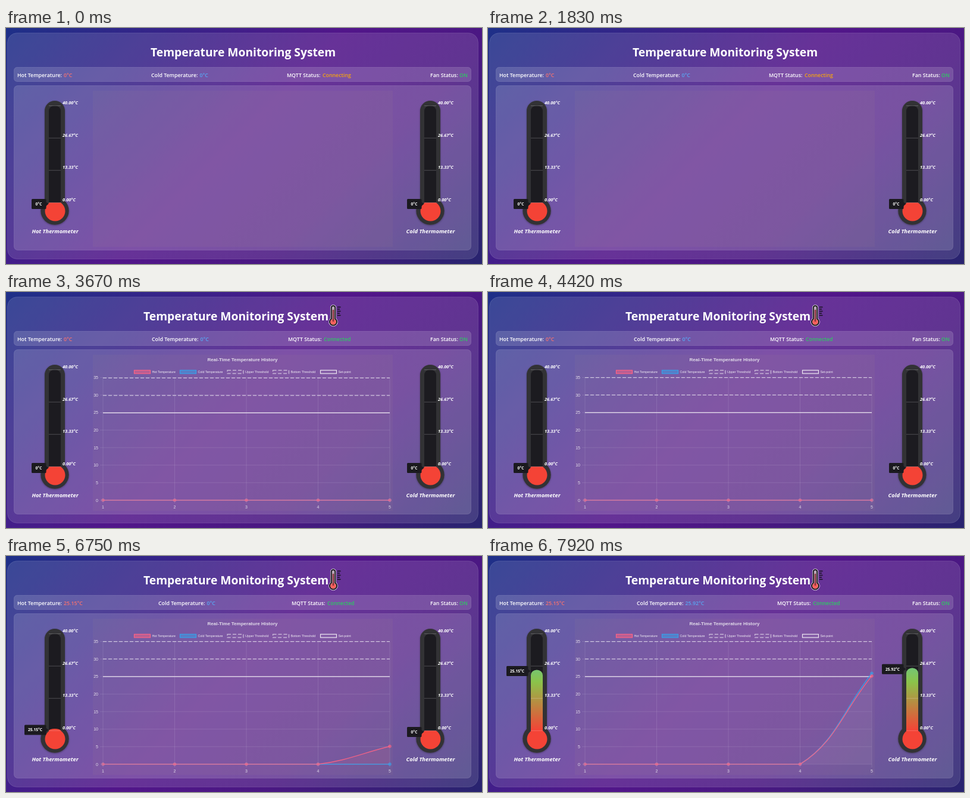
Recreate the animation shown at these times as an HTML page. Size 800 px wide and 399 px high, loop 8 s.

```html
<!DOCTYPE html>
<html lang="en">
<head>
<meta charset="utf-8">
<title>Temperature Monitoring System</title>
<style>
  html, body { margin: 0; width: 100%; height: 100%; overflow: hidden; }
  body { background: linear-gradient(135deg, #1e3088, #52168a 48%, #4a1882 70%, #28246f); }
  svg { display: block; width: 800px; height: 399px; }
  text { font-family: "Open Sans", "Noto Sans", sans-serif; font-weight: 600; fill: #fff; }
  .title { font-size: 19.25px; font-weight: 700; }
  .status text { font-size: 8.8px; }
  .scale { font-size: 7.4px; font-style: italic; font-weight: 700; }
  .name { font-size: 9.3px; font-style: italic; font-weight: 700; text-anchor: middle; }
  .tip { font-size: 6.6px; font-weight: 700; text-anchor: middle; }
  .chart text { font-family: "Liberation Sans", Arial, sans-serif; font-weight: 400; fill: #e2dcea; }
  .chart .heading { font-size: 8px; font-weight: 700; text-anchor: middle; }
  .chart .legend { font-size: 5.3px; fill: #f0ecf4; }
  .chart .axis { font-size: 7px; }
</style>
</head>
<body>
<svg viewBox="0 0 800 399">
  <defs>
    <linearGradient id="mercury" gradientUnits="userSpaceOnUse" x1="0" y1="131" x2="0" y2="295">
      <stop stop-color="#3dcadf"/><stop offset=".5" stop-color="#8bc34a"/><stop offset="1" stop-color="#f44336"/>
    </linearGradient>
    <filter id="soft" x="-20%" y="-20%" width="140%" height="140%">
      <feDropShadow dx="0" dy="1" stdDeviation="1.5" flood-opacity=".35"/>
    </filter>
  </defs>
  <g fill="#fff" stroke="#fff" stroke-opacity=".13">
    <rect x="2.5" y="8.5" width="791" height="382" rx="16" fill-opacity=".12"/>
    <rect x="13.5" y="66.5" width="768" height="24" rx="5" fill-opacity=".15"/>
    <rect x="13.5" y="97.5" width="768" height="278" rx="6" fill-opacity=".15"/>
  </g>
  <rect x="146" y="106" width="504" height="264" fill="#a08488" fill-opacity=".1"/>
  <text class="title" id="title" y="48">Temperature Monitoring System</text>
  <g id="icon" stroke="#16131c" stroke-linecap="round">
    <path d="M546.7 45.5V26.5a3.3 3.3 0 0 1 6.6 0V45.5a6 6 0 1 1-6.6 0Z" fill="#e9dfe6" stroke="#f4f1f4" stroke-width="3.4"/>
    <path d="M546.7 45.5V26.5a3.3 3.3 0 0 1 6.6 0V45.5a6 6 0 1 1-6.6 0Z" fill="#b9a9b6" stroke-width="2"/>
    <circle cx="550" cy="50.5" r="4.8" fill="#f8615c" stroke="none"/>
    <path d="M550 49V31" stroke="#8e3440" stroke-width="2.6"/>
    <path d="M557.5 25.5h4.5M557.5 29h3M557.5 32.5h4.5M557.5 36h3M557.5 39.5h4.5" stroke-width="1.4"/>
  </g>
  <g class="status">
    <text x="19" y="82.5">Hot Temperature:</text><text id="hotValue" x="97" y="82.5" style="fill:#f8716f"></text>
    <g id="coldStatus"><text y="82.5">Cold Temperature:</text><text id="coldValue" x="81.5" y="82.5" style="fill:#58a6f2"></text></g>
    <g id="mqttStatus"><text y="82.5">MQTT Status:</text><text id="mqttValue" x="60" y="82.5"></text></g>
    <text x="713" y="82.5">Fan Status:</text><text x="762" y="82.5" style="fill:#2bcb62">ON</text>
  </g>
  <g id="thermometers"></g>
  <g class="chart" id="chart"></g>
</svg>
<script>
const LOOP = 8000;
const CHART_AT = 2917, CONNECTED_AT = 3300, HOT_AT = 6696, COLD_AT = 6860;
const HOT = 25.15, COLD = 25.92;
const PINK = '#ff6384', BLUE = '#36a2eb', WHITE = 'rgba(255,255,255,.62)';

const $ = id => document.getElementById(id);
const clamp = v => Math.min(1, Math.max(0, v));
const easeOutQuart = p => 1 - (1 - clamp(p)) ** 4;
const easeInOut = p => { p = clamp(p); return p * p * (3 - 2 * p); };
const xAt = i => 163 + i * 120.5;
const yAt = v => 352 - v * 207.5 / 35;

function thermometer(id, x, name) {
  const ticks = [40, 26.67, 13.33, 0].map((v, i) => {
    const y = 131.5 + i * 54.6;
    return `<path d="M72 ${y}h20" stroke="#fff" stroke-opacity=".22"/>
      <text class="scale" x="95" y="${y - 2.3}">${v.toFixed(2)}°C</text>`;
  }).join('');
  return `<g transform="translate(${x})">
    <g fill="#323234" filter="url(#soft)"><rect x="65" y="123" width="34" height="185" rx="17"/><circle cx="82" cy="309" r="23.7"/></g>
    <circle cx="82.5" cy="309.5" r="17" fill="#f44336"/>
    <path d="M72 295.5V140a10 9 0 0 1 20 0V295.5Z" fill="#1c1b20"/>
    <path id="${id}Fill" fill="url(#mercury)"/>
    ${ticks}
    <g id="${id}Tip"><path id="${id}Box" fill="#1b1a1f"/><text class="tip" id="${id}Text" y="2.4"></text></g>
    <text class="name" x="82.5" y="347">${name}</text></g>`;
}

function chartMarkup() {
  let out = '<text class="heading" x="397.5" y="116.5">Real-Time Temperature History</text>';
  const legend = [
    [215, 'Hot Temperature', PINK, .5], [292, 'Cold Temperature', BLUE, .5],
    [371.5, 'Upper Threshold', WHITE, .06, 1], [448, 'Bottom Threshold', WHITE, .06, 1], [528, 'Set-point', '#eee8f2', .06]
  ];
  for (const [x, label, color, alpha, dashed] of legend)
    out += `<rect x="${x + .5}" y="132.3" width="27" height="5.6" fill="${color}" fill-opacity="${alpha}" stroke="${color}"
      stroke-width="1.2" ${dashed ? 'stroke-dasharray="6 3"' : ''}/><text class="legend" x="${x + 30.5}" y="137">${label}</text>`;
  for (let v = 0; v <= 35; v += 5)
    out += `<path d="M158 ${yAt(v)}H645" stroke="#fff" stroke-opacity=".11"/>
      <text class="axis" x="155" y="${yAt(v) + 2.5}" text-anchor="end">${v}</text>`;
  for (let i = 0; i < 5; i++)
    out += `<path d="M${xAt(i)} 144.5V357" stroke="#fff" stroke-opacity=".11"/>
      <text class="axis" x="${xAt(i)}" y="366" text-anchor="middle">${i + 1}</text>`;
  out += `<path id="setLine" stroke="#eee8f2" stroke-width="1.3"/>
    <path id="lowLine" stroke="${WHITE}" stroke-width="1.25" stroke-dasharray="6 3"/>
    <path id="highLine" stroke="${WHITE}" stroke-width="1.25" stroke-dasharray="6 3"/>`;
  for (const [id, color] of [['cold', BLUE], ['hot', PINK]]) {
    out += `<path id="${id}Area" fill="${color}" fill-opacity=".1"/><path id="${id}Line" fill="none" stroke="${color}" stroke-opacity=".85" stroke-width="1.5"/>`;
    for (let i = 0; i < 5; i++)
      out += `<circle ${i == 4 ? `id="${id}Dot"` : ''} cx="${xAt(i)}" cy="352" r="2.4" fill="${color}" fill-opacity=".6" stroke="${color}" stroke-opacity=".7" stroke-width=".8"/>`;
  }
  return out;
}

$('thermometers').innerHTML = thermometer('hot', 0, 'Hot Thermometer') + thermometer('cold', 631, 'Cold Thermometer');
$('chart').innerHTML = chartMarkup();

// Flat history with a smoothed rise to the newest reading.
function drawSeries(id, value) {
  const x4 = xAt(3), x5 = xAt(4), y = yAt(value), step = x5 - x4, rise = 352 - y;
  const length = Math.hypot(step, rise), k = .4 * length / (length + step);
  const curve = `M163 352H${x4}C${x4 + 2 * k * step} ${352 - k * rise} ${x5 - .4 * step} ${y + .4 * rise} ${x5} ${y}`;
  $(id + 'Line').setAttribute('d', curve);
  $(id + 'Area').setAttribute('d', curve + 'V352Z');
  $(id + 'Dot').setAttribute('cy', y);
}

function drawReading(id, target, elapsed) {
  const known = elapsed >= 0, label = known ? target + '°C' : '0°C';
  const height = easeInOut(elapsed / 500) * target * 164 / 40;
  const top = 295.5 - height, r = Math.min(9, height), width = known ? 36 : 24;
  $(id + 'Value').textContent = $(id + 'Text').textContent = label;
  $(id + 'Fill').setAttribute('d', `M72 296V${top + r}a10 ${r} 0 0 1 20 0V296Z`);
  $(id + 'Tip').setAttribute('transform', `translate(0 ${top + 2})`);
  $(id + 'Box').setAttribute('d', `M${68.5 - width} -8.5H66q1.5 0 1.5 1.5V-3l4 3l-4 3V7q0 1.5-1.5 1.5H${68.5 - width}q-1.5 0-1.5-1.5V-7q0-1.5 1.5-1.5Z`);
  $(id + 'Text').setAttribute('x', 67 - width / 2);
  drawSeries(id, target * easeOutQuart(elapsed / 1000));
}

function draw(t) {
  const loaded = t >= CHART_AT, connected = t >= CONNECTED_AT;
  $('icon').style.display = $('chart').style.display = loaded ? '' : 'none';
  $('title').setAttribute('x', loaded ? 231 : 243);

  const stage = connected + (t >= HOT_AT) + (t >= COLD_AT);
  $('coldStatus').setAttribute('transform', `translate(${[244, 245, 256, 250][stage]})`);
  $('mqttStatus').setAttribute('transform', `translate(${[472, 474, 480, 486][stage]})`);
  $('mqttValue').textContent = connected ? 'Connected' : 'Connecting';
  $('mqttValue').style.fill = connected ? '#2bcb62' : '#f5a30f';

  const grow = easeOutQuart((t - CHART_AT) / 1000);
  for (const [id, v] of [['set', 25], ['low', 30], ['high', 35]])
    $(id + 'Line').setAttribute('d', `M163 ${yAt(v * grow)}H645`);

  drawReading('hot', HOT, t - HOT_AT);
  drawReading('cold', COLD, t - COLD_AT);
}

const start = performance.now();
function tick() {
  draw((performance.now() - start) % LOOP);
  requestAnimationFrame(tick);
}
tick();
</script>
</body>
</html>
```
